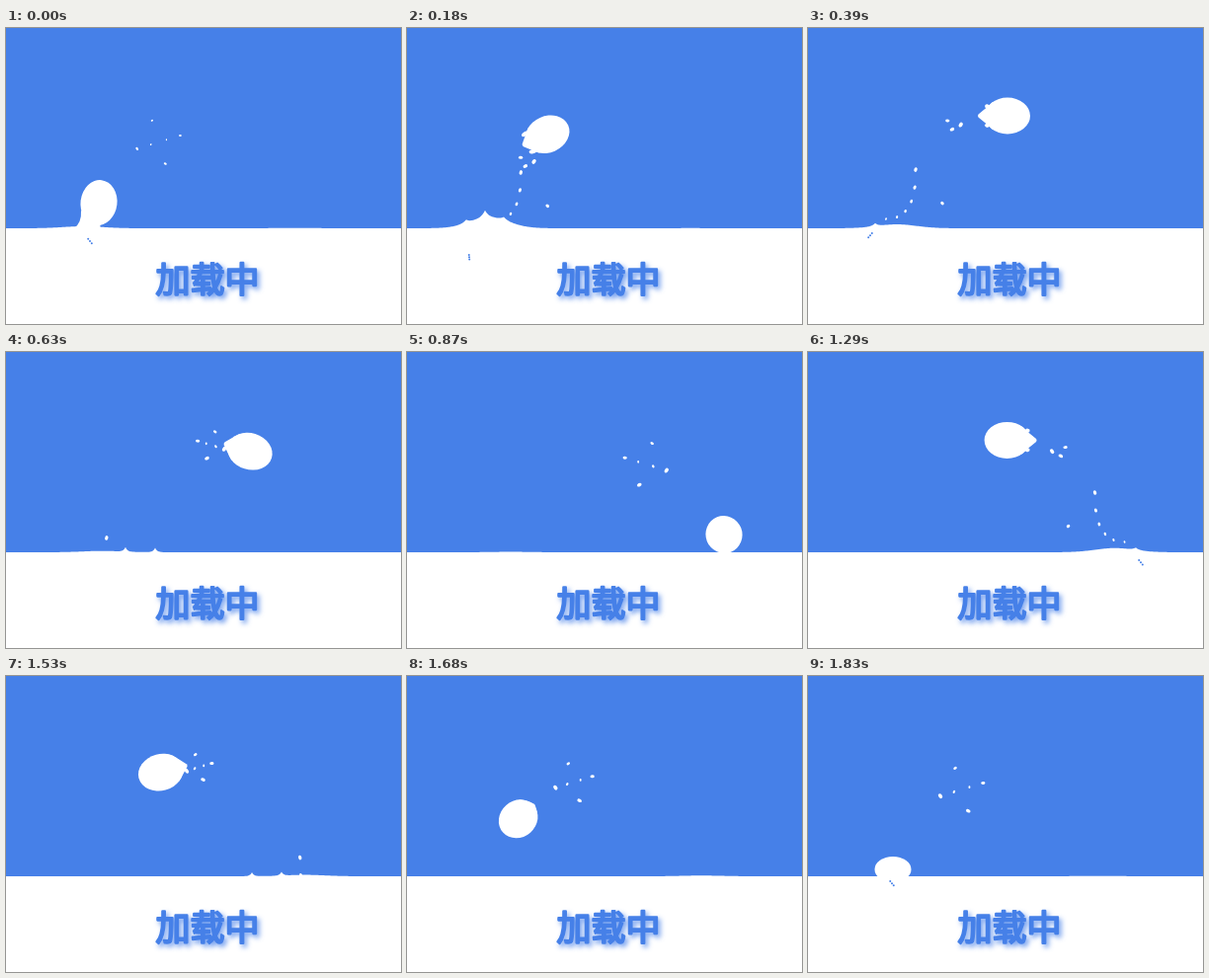
Write an HTML page with a canvas that moves like this. It is 400x300 px and loops after 1860 ms.

```html
<!DOCTYPE html>
<html lang="zh">
<head>
<meta charset="utf-8">
<title>加载中</title>
<style>
html, body { margin: 0; width: 100%; height: 100%; overflow: hidden; background: #4680e8; }
canvas { display: block; }
</style>
</head>
<body>
<canvas id="stage" width="400" height="300"></canvas>
<script>
const ctx = document.getElementById('stage').getContext('2d');
const BLUE = '#4680e8', WHITE = '#fff';
const WIDTH = 400, LEVEL = 203;
const LOOP = 1860, BACK = 915, STEP = 30;
const RISE = -30;   // phase at which the ball breaks the surface

// one jump as phase, x, y; the way back is its mirror image
const jump = [
  [-30, 86, 196], [0, 94, 177], [165, 138, 111],
  [390, 202, 89], [622, 245, 99], [870, 321, 185]
];

const mix = (a, b, u) => a + (b - a) * u;
const clamp = v => Math.max(0, Math.min(1, v));
const pulse = (p, mid, half) => clamp(1 - Math.abs(p - mid) / half);

function slope(i, k) {
  const a = jump[Math.max(0, i - 1)], b = jump[Math.min(jump.length - 1, i + 1)];
  return (b[k] - a[k]) / (b[0] - a[0]);
}

// smooth curve through the key points
function ballAt(p) {
  let i = 0;
  while (i < jump.length - 2 && p >= jump[i + 1][0]) i++;
  const a = jump[i], b = jump[i + 1], d = b[0] - a[0], u = (p - a[0]) / d, v = 1 - u;
  return [1, 2].map(k =>
    v * v * ((1 + 2 * u) * a[k] + u * d * slope(i, k)) +
    u * u * ((1 + 2 * v) * b[k] - v * d * slope(i + 1, k)));
}

function oval(x, y, rx, ry, turn = 0) {
  ctx.beginPath();
  ctx.ellipse(x, y, rx, ry, turn, 0, 7);
  ctx.fill();
}

function drawBall(p) {
  const [x, y] = ballAt(p);
  if (p < 0) return oval(x, y, 18.5, 13);
  const k = (p - 390) / 390;
  const turn = k * Math.abs(k) * (k < 0 ? 83 : 45) * Math.PI / 180;
  const a = 23 - 4 * clamp((p - 630) / 240), b = 18.5;
  const tail = 6.5 * Math.sin(Math.PI * clamp(p / 800)), nub = 5 * (1 - p / 700);
  ctx.save();
  ctx.translate(x, y);
  ctx.rotate(turn);
  oval(0, 0, a, b);
  if (tail > 0.1) {
    ctx.beginPath();
    ctx.moveTo(-a * 0.64, -b * 0.77);
    ctx.quadraticCurveTo(-a * 0.95, -b * 0.4, -a - tail, -1.5);
    ctx.quadraticCurveTo(-a - tail - 1, 0, -a - tail, 1.5);
    ctx.quadraticCurveTo(-a * 0.95, b * 0.4, -a * 0.64, b * 0.77);
    ctx.fill();
  }
  if (p > 120 && p < 480) {
    for (const s of [-1, 1]) oval(-a * 0.9, s * b * 0.53, nub, 2, s * 0.2);
  }
  ctx.restore();
  if (p < 120) drawNeck(x, y, 12 * (1 - p / 120));
}

// strand of water still joining the ball to the surface
function drawNeck(x, y, w) {
  ctx.beginPath();
  ctx.moveTo(x - 18, y + 8);
  ctx.quadraticCurveTo(84 - w * 0.6, LEVEL - 6, 81 - w, LEVEL);
  ctx.lineTo(84 + w, LEVEL);
  ctx.quadraticCurveTo(84 + w * 0.8, LEVEL - 5, x + 6, y + 18);
  ctx.fill();
}

// water thrown up where the ball left
function height(x, p) {
  if (p < 0) return 0;
  const swell = p < 165 ? mix(2, 11, p / 165) : 11 * Math.exp((165 - p) / 220);
  const bump = (mid, w) => Math.exp(-(((x - mid) / w) ** 2));
  const spike = (mid, w) => Math.exp(-Math.abs(x - mid) / w);
  let h = swell * bump(mix(78, 90, p / 390), 28);
  for (const k of [-1, 0, 1]) {
    h += pulse(p, 165, 150) * (9 - 5 * Math.abs(k)) * spike(79 + 19 * k, 4);
  }
  h += 3 * pulse(p, 390, 90) * spike(68, 3);
  for (const mid of [121, 151]) h += 5 * pulse(p, 640, 110) * spike(mid, 2);
  return h;
}

function drawWater(p) {
  ctx.beginPath();
  ctx.moveTo(0, LEVEL + 1);
  for (let x = 0; x <= WIDTH; x++) ctx.lineTo(x, LEVEL - height(x, p));
  ctx.lineTo(WIDTH, LEVEL + 1);
  ctx.fill();
}

// four drops on a ring, further ones closer in
function cluster(x, y, spread, count, size) {
  for (let i = 0; i < count; i++) {
    const ang = (17 + (i < 4 ? 90 * i : 180 * i)) * Math.PI / 180;
    const d = spread * (i < 4 ? 1 : 0.36), r = size * (2.3 - 0.22 * i);
    oval(x + d * Math.cos(ang), y + d * Math.sin(ang), r * 1.15, r * 0.8, 2.2 + i * 0.5);
  }
}

function drawDrops(p) {
  if (p > 90 && p < 510) {
    const u = (p - 165) / 225;
    cluster(mix(120, 148, u), mix(136, 96, u), 7, 3, clamp((510 - p) / 100));
  }
  if (p > 540 && p < 990) {
    const ease = 1 - (1 - (p - 540) / 450) ** 2;
    const size = clamp(Math.min((p - 540) / 60, (990 - p) / 70));
    cluster(mix(186, 246, ease), mix(82, 116, ease), mix(9, 23, ease), 6, size);
  }
  if (p > 90 && p < 720) {
    const fall = 40 * ((p - 300) / 300) ** 2, drift = (390 - p) * 0.03;
    for (let v = 0; v < 1.1; v += 0.2) {
      const r = 1 + 0.8 * v;
      oval(79 + 62 * v - 32 * v * v + drift, 190 - 50 * v * v + fall, r * 0.9, r * 1.3, 0.3);
    }
    oval(136 + drift, 174 + fall, 1.9, 1.5, 0.7);
  }
}

function drawBubbles(p) {
  if (p < -45 || p > 450) return;
  const x = 85 - 22 * clamp(p / 165), y = 216 + 0.18 * p - 0.0005 * p * p;
  const lean = 1.8 * Math.cos(p / 390 * Math.PI);
  for (const k of [-1, 0, 1]) oval(x + k * lean, y + k * 2.2, 1, 1);
}

function drawLabel() {
  const text = ['加载中', 204, 268];
  ctx.save();
  ctx.font = '400 35px "Noto Sans CJK SC", "Noto Sans CJK", sans-serif';
  ctx.textAlign = 'center';
  ctx.lineJoin = ctx.lineCap = 'round';
  ctx.lineWidth = 2.2;
  ctx.fillStyle = ctx.strokeStyle = BLUE;
  ctx.shadowColor = 'rgba(70,128,232,0.8)';
  ctx.shadowOffsetX = ctx.shadowOffsetY = 2.5;
  ctx.shadowBlur = 5;
  ctx.strokeText(...text);
  ctx.shadowColor = 'transparent';
  ctx.fillText(...text);
  ctx.restore();
}

// calls paint with the phase of each jump, the second one mirrored
function bothWays(t, color, paint) {
  for (const begin of [0, BACK]) {
    const p = (t - begin - RISE + 2 * LOOP) % LOOP + RISE;
    ctx.save();
    ctx.fillStyle = color;
    if (begin) {
      ctx.translate(WIDTH, 0);
      ctx.scale(-1, 1);
    }
    paint(p, begin);
    ctx.restore();
  }
}

function draw(now) {
  const t = Math.floor(now % LOOP / STEP) * STEP;
  ctx.fillStyle = BLUE;
  ctx.fillRect(0, 0, WIDTH, LEVEL);
  ctx.fillStyle = WHITE;
  ctx.fillRect(0, LEVEL, WIDTH, 300 - LEVEL);
  bothWays(t, WHITE, (p, begin) => {
    drawWater(p);
    drawDrops(p);
    const end = begin ? LOOP - BACK : BACK;
    if (p < end + RISE) drawBall(p);
  });
  // keeps everything below the surface white apart from the bubbles
  bothWays(t, BLUE, drawBubbles);
  drawLabel();
}

const start = performance.now();
function tick() {
  draw(performance.now() - start);
  requestAnimationFrame(tick);
}
tick();
</script>
</body>
</html>
```
